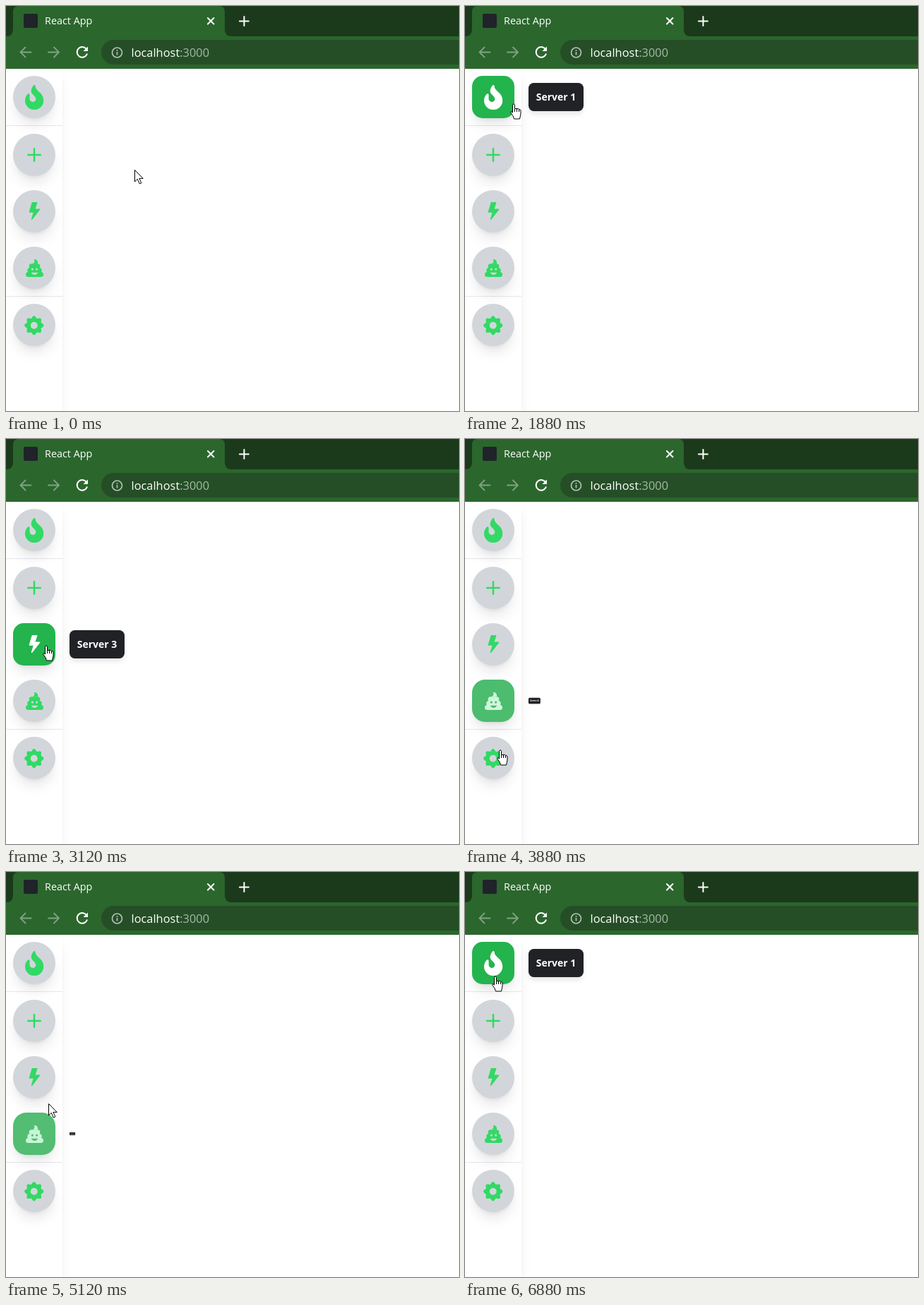
Animation, 642 px wide and 574 px high, one loop 6920 ms. Source, as an HTML page:

```html
<!DOCTYPE html>
<html lang="en">
<head>
<meta charset="utf-8">
<title>Sidebar hover</title>
<style>
  html, body { margin: 0; width: 100%; height: 100%; overflow: hidden; background: #fff; }
  body { position: relative; font-family: "Open Sans", "Noto Sans", sans-serif; }
  svg { display: block; overflow: visible; }
  .chrome, .cursor { position: absolute; left: 0; top: 0; }
  .sidebar, .item {
    box-shadow: 0 12.5px 18.75px -3.75px rgba(0, 0, 0, .1), 0 5px 7.5px -5px rgba(0, 0, 0, .1);
  }
  .sidebar { position: absolute; left: 0; top: 89px; width: 80px; height: 485px; background: #fff; }
  .rule { position: absolute; left: 0; width: 80px; height: 1px; background: #e5e7eb; }
  .item {
    --h: 0; --s: 0;
    --bg: color-mix(in srgb, #23b44d calc(var(--h) * 100%), #d2d6da);
    position: absolute; left: 10px; width: 60px; height: 60px;
    display: flex; align-items: center; justify-content: center;
    border-radius: calc(30px - 15px * var(--h));
    color: color-mix(in srgb, #fff calc(var(--h) * 100%), #32d964);
    background: var(--bg);
  }
  .item svg { fill: currentColor; }
  .item .line { fill: none; stroke: currentColor; }
  .item .face { fill: var(--bg); }
  .tip {
    position: absolute; left: 80px; top: 10px; width: 78px; height: 40px;
    border-radius: 7.5px; background: #202225; color: #fff;
    font-size: 14px; font-weight: 700; line-height: 40px; text-align: center; white-space: nowrap;
    transform: scale(var(--s)); transform-origin: left center;
    box-shadow: 0 5px 7.5px -1px rgba(0, 0, 0, .1);
  }
  .cursor path { fill: #fff; stroke: #000; stroke-linejoin: round; }
</style>
</head>
<body>
<div class="sidebar"></div>

<svg class="chrome" width="642" height="89" fill="none" stroke-linecap="round">
  <rect width="642" height="89" fill="#2b662d"/>
  <path fill="#1b3a1b" d="M0 0H18Q10 0 10 8V33Q10 43 0 43zM302 0H642V43H320Q310 43 310 33V8Q310 0 302 0z"/>
  <rect x="135" y="48" width="540" height="35" rx="17.5" fill="#254e27"/>
  <rect x="25" y="11" width="20" height="20" rx="2" fill="#20232a"/>
  <g stroke="#fff" stroke-width="2">
    <path d="M286 17l8.5 8.5m0-8.5l-8.500 8.500M331 21.500h13M337.500 15v13"/>
    <path d="M114.500 62A7.300 7.300 0 1 0 115 67.500" stroke-linecap="butt"/>
    <path d="M116 57.500v6.500h-6.500z" fill="#fff" stroke="none"/>
  </g>
  <path stroke="#7fa381" stroke-width="1.8" d="M35.500 65.500h-15m7-7l-7 7 7 7M60 65.500h15m-7-7l7 7-7 7"/>
  <g stroke="#b0c2b1" stroke-width="1.700">
    <circle cx="157.5" cy="66" r="7"/>
    <path stroke-linecap="butt" d="M157.500 65v4.500m0-7.500v1.800"/>
  </g>
  <text x="55" y="26" font-size="14.4" fill="#fff">React App</text>
  <text x="177.5" y="72" font-size="16.4" fill="#fff">localhost<tspan fill="#a5bba6">:3000</tspan></text>
</svg>

<div id="items"></div>

<svg class="cursor" id="cursor" width="18" height="24">
  <path id="arrow" d="M.5.5V17l3.800-3.700 3 6.700 2.600-1.100-3-6.500h5.300z"/>
  <g id="hand" transform="translate(-5 -1)">
    <path d="M3.500 13V2.500a1.500 1.500 0 0 1 3 0V7.500q5-1 8.500 2V15l-1.500 7h-8Q5 18 1 13.500q-1-3.500 2.500-.5z"/>
    <path d="M6.500 8v4m3-4v4m3-3v3"/>
  </g>
</svg>

<script>
const LOOP = 6920, STEP = 40;
const FADE = 300, POP = 100, LAG = 65, TICK = 10;
const SIZE = 60;

const flame = `<path d="M216 24c0-24-31-33-44-13C48 192 224 200 224 288c0 36-29 64-65 64
  -35 0-63-30-63-65v-85c0-22-26-33-41-17C28 213 0 261 0 320a192 192 0 0 0 384 0C384 150 216 127 216 24z"/>`;

const plus = `<path class="line" stroke-linecap="round" d="M8 4.500v7M4.500 8h7"/>`;

const bolt = `<path stroke="currentColor" stroke-linejoin="round" d="M6 .5h4l-2 6h4.500l-7 9 2-6.500h-4z"/>`;

const layers = [0, 1, 2].map(i =>
  `<rect x="${48 * i}" y="${368 - 120 * i}" width="${512 - 96 * i}" height="144" rx="72"/>`).join('');
const poo = `${layers}<path d="M241 2a96 96 0 0 1 105 126H176A80 80 0 0 0 241 2z"/>
  <g class="face"><circle cx="192" cy="288" r="32"/><circle cx="320" cy="288" r="32"/>
  <path d="M160 384h192q-24 64-96 64t-96-64z"/></g>`;

const teeth = [...Array(8)].map((_, i) =>
  `<path transform="rotate(${i * 45} 8 8)" d="M5.300 3L6.600 1Q8-1 9.400 1L10.700 3z"/>`).join('');
const gear = `${teeth}<circle class="line" cx="8" cy="8" r="4.5" stroke-width="3.200"/>`;

// icon, view box width and height, drawn height
const icons = [[flame, 384, 512, 35], [plus, 16, 16, 40], [bolt, 16, 16, 25], [poo, 512, 512, 25], [gear, 16, 16, 27.5]];

// pointer stops: time, x, y
const stops = [
  [0, 182, 232], [900, 182, 232], [1500, 69, 139], [1900, 69, 139], [2800, 57, 293], [3120, 57, 293],
  [3640, 54, 371], [3880, 50, 441], [4350, 48, 455], [4930, 58, 345], [5120, 60, 328],
  [5600, 46, 225], [5950, 46, 225], [6400, 43, 148], [LOOP, 43, 148],
];

const $ = id => document.getElementById(id);
const clamp = v => Math.max(0, Math.min(1, v));
const ease = v => v * v * (3 - 2 * v);

// even spacing, plus a rule above the second and the last button
const topOf = i => 99.2 + 80.3 * i + (i > 0) + (i > 3);

function add(className, top, html = '') {
  const el = document.createElement('div');
  el.className = className;
  el.style.top = top + 'px';
  el.innerHTML = html;
  $('items').append(el);
  return el;
}

for (const i of [1, 4]) add('rule', Math.round(topOf(i) - 11.500));
const items = icons.map(([icon, w, h, size], i) => add('item', topOf(i),
  `<svg height="${size}" width="${size * w / h}" viewBox="0 0 ${w} ${h}">${icon}</svg>
   <div class="tip">Server ${i + 1}</div>`));

function pointer(t) {
  const i = stops.findIndex(stop => stop[0] > t);
  const [t0, x0, y0] = stops[i - 1], [t1, x1, y1] = stops[i];
  const k = (t - t0) / (t1 - t0);
  return [x0 + (x1 - x0) * k, y0 + (y1 - y0) * k];
}

// index of the button under the pointer, or -1
function hovered(t) {
  const [x, y] = pointer(Math.max(0, t));
  return x > 70 ? -1 : items.findIndex((_, i) => y >= topOf(i) && y <= topOf(i) + SIZE);
}

// replays the hovers up to t; buttons answer a little after the pointer
function levels(t) {
  const state = items.map(() => ({ fade: 0, pop: 0 }));
  for (let u = 0; u < t; u += TICK) {
    const hit = hovered(u - LAG);
    state.forEach((s, i) => {
      const d = i === hit ? TICK : -TICK;
      s.fade = clamp(s.fade + d / FADE);
      s.pop = clamp(s.pop + d / POP);
    });
  }
  return state;
}

function draw(t) {
  levels(t).forEach(({ fade, pop }, i) => {
    items[i].style.setProperty('--h', fade);
    items[i].style.setProperty('--s', ease(pop));
  });
  const [x, y] = pointer(t);
  const over = hovered(t) >= 0;
  $('cursor').style.transform = `translate(${Math.round(x)}px, ${Math.round(y)}px)`;
  $('hand').style.display = over ? '' : 'none';
  $('arrow').style.display = over ? 'none' : '';
}

const start = performance.now();
function tick() {
  const t = Math.max(0, performance.now() - start) % LOOP;
  draw(Math.floor(t / STEP) * STEP);
  requestAnimationFrame(tick);
}
tick();
</script>
</body>
</html>
```
